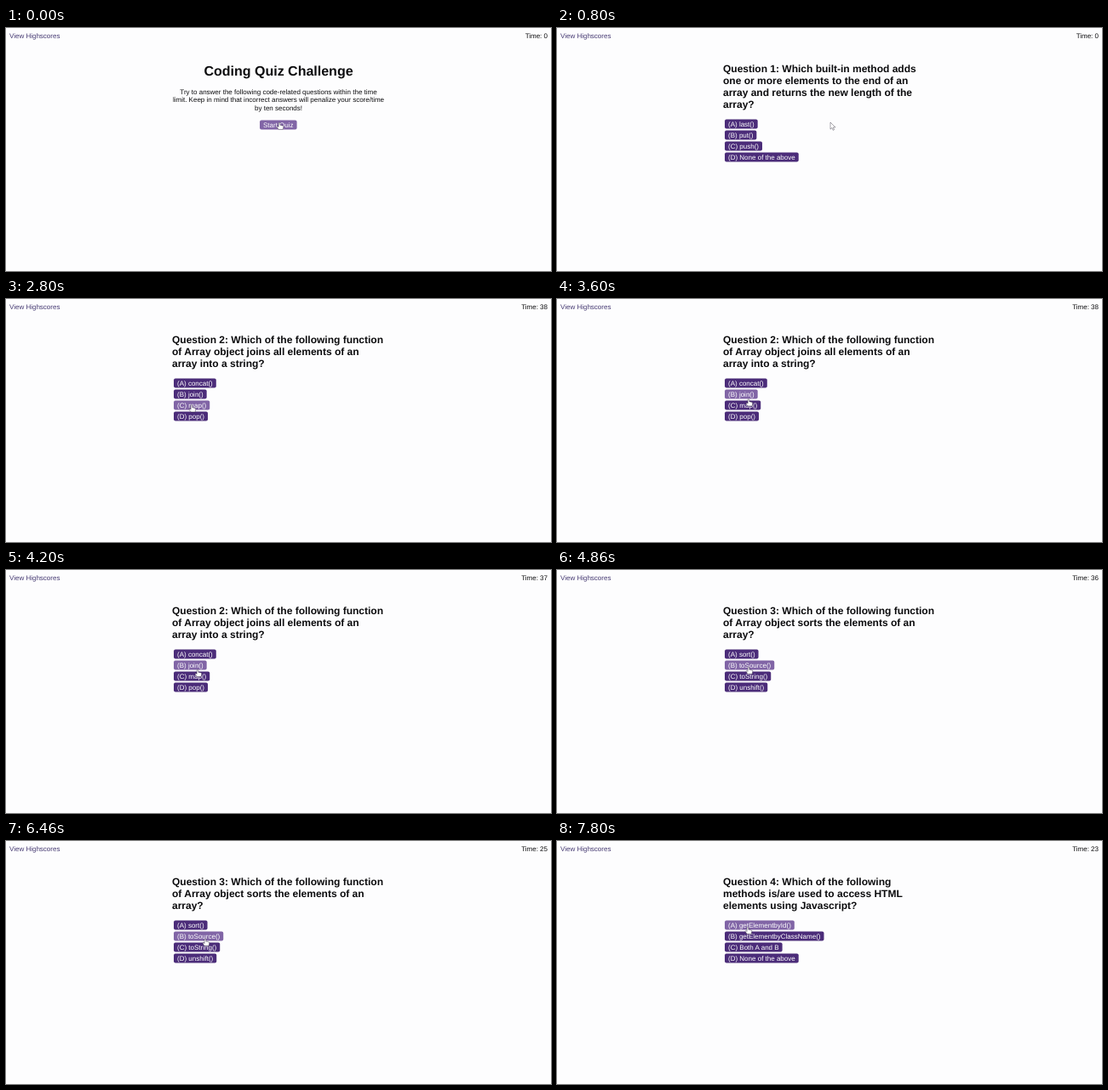
Write an HTML page with a canvas that moves like this. It is 640x286 px and loops after 8 s.

```html
<!DOCTYPE html>
<html lang="en">
<head>
<meta charset="utf-8">
<title>Coding Quiz Challenge</title>
<style>
html, body { margin: 0; width: 100%; height: 100%; overflow: hidden; background: #fdfdfe; }
canvas { display: block; width: 640px; height: 286px; }
</style>
</head>
<body>
<canvas id="stage"></canvas>
<script>
const W = 640, H = 286, LOOP = 8000, STEP = 200 / 3;
const FONT = '"Liberation Sans", Arial, sans-serif';
const INK = '#0c0c0e', LINK = '#463a72', DARK = '#4b2c79', LIGHT = '#8165a6';

const canvas = document.getElementById('stage');
const ratio = window.devicePixelRatio || 1;
canvas.width = W * ratio;
canvas.height = H * ratio;
const ctx = canvas.getContext('2d');
ctx.scale(ratio, ratio);
ctx.textRendering = 'geometricPrecision';

const screens = [
  { at: 0 },
  { at: 800,
    lines: ['Question 1: Which built-in method adds', 'one or more elements to the end of an',
      'array and returns the new length of the', 'array?'],
    answers: ['last()', 'put()', 'push()', 'None of the above'] },
  { at: 2460,
    lines: ['Question 2: Which of the following function', 'of Array object joins all elements of an',
      'array into a string?'],
    answers: ['concat()', 'join()', 'map()', 'pop()'] },
  { at: 4800,
    lines: ['Question 3: Which of the following function', 'of Array object sorts the elements of an',
      'array?'],
    answers: ['sort()', 'toSource()', 'toString()', 'unshift()'] },
  { at: 7330,
    lines: ['Question 4: Which of the following', 'methods is/are used to access HTML',
      'elements using Javascript?'],
    answers: ['getElementbyId()', 'getElementbyClassName()', 'Both A and B', 'None of the above'] }
];

const intro = ['Try to answer the following code-related questions within the time',
  'limit. Keep in mind that incorrect answers will penalize your score/time',
  'by ten seconds!'];

const clock = [
  { at: 0, left: 0 }, { at: 1860, left: 39 }, { at: 2800, left: 38 }, { at: 3860, left: 37 },
  { at: 4800, left: 36 }, { at: 5930, left: 25 }, { at: 6800, left: 24 }, { at: 7800, left: 23 }
];

// Pointer hot spot: time, x, y
const path = [
  [0, 321, 111], [1000, 321, 111], [1800, 229, 118.7], [2260, 222, 138], [2460, 222, 138],
  [2660, 218, 124.5], [3000, 218, 124.5], [3400, 224, 121], [3800, 226, 114],
  [4200, 225, 117], [4530, 225, 114], [5060, 225, 114], [5600, 239, 113],
  [5930, 238, 114], [6460, 234, 115], [6800, 232, 112], [7330, 224, 101], [8000, 224, 101]
];

const current = (list, t) => list.filter(item => item.at <= t).pop();

function pointerAt(t) {
  const time = Math.floor((t + 7) / STEP) * STEP;
  const i = Math.max(1, path.findIndex(p => p[0] >= time));
  const [t0, x0, y0] = path[i - 1], [t1, x1, y1] = path[i];
  const u = (time - t0) / (t1 - t0), k = u * u * (3 - 2 * u);
  return { x: x0 + (x1 - x0) * k, y: y0 + (y1 - y0) * k };
}

function text(str, x, y, size = 8, { color = INK, bold = false, align = 'left' } = {}) {
  ctx.font = `${bold ? 'bold ' : ''}${size}px ${FONT}`;
  ctx.fillStyle = color;
  ctx.textAlign = align;
  ctx.fillText(str, x, y);
}

// Returns whether the pointer is over the button
function button(label, x, middle, pointer) {
  ctx.font = `8px ${FONT}`;
  const w = ctx.measureText(label).width + 8, top = middle - 5.5;
  const over = pointer.x >= x && pointer.x <= x + w && pointer.y >= top && pointer.y <= top + 11;
  ctx.fillStyle = over ? LIGHT : DARK;
  ctx.beginPath();
  ctx.roundRect(x, top, w, 11, 2);
  ctx.fill();
  text(label, x + 4, middle + 2.8, 8, { color: '#fff' });
  return over;
}

const arrow = new Path2D('M0 0V8.2L1.9 6.4L3.2 9.3L4.5 8.7L3.3 5.9H5.9Z');
const hand = new Path2D('M-.9 .7Q0 -.6 .8 .7V3.2L4 3.9Q4.9 4.2 4.8 5.2L4.2 8.4H-.9L-2.9 5.6Q-3 4.5 -1.9 4.7L-.9 5.5Z');

function drawPointer({ x, y }, shape) {
  ctx.save();
  ctx.translate(x, y);
  ctx.fillStyle = '#fff';
  ctx.strokeStyle = 'rgba(20, 15, 30, .75)';
  ctx.lineWidth = 0.5;
  ctx.fill(shape);
  ctx.stroke(shape);
  ctx.restore();
}

function drawIntro(pointer) {
  text('Coding Quiz Challenge', 320, 56, 16, { bold: true, align: 'center' });
  intro.forEach((line, i) => text(line, 320, 78 + i * 9.25, 8, { align: 'center' }));
  return button('Start Quiz', 298, 114, pointer);
}

function drawQuestion({ lines, answers }, pointer) {
  lines.forEach((line, i) => text(line, 195, 52.4 + i * 14, 12, { bold: true }));
  const first = 57 + lines.length * 14;
  return answers
    .map((answer, i) => button(`(${'ABCD'[i]}) ${answer}`, 197, first + i * 13, pointer))
    .includes(true);
}

function draw(t) {
  const pointer = pointerAt(t), screen = current(screens, t);
  ctx.fillStyle = '#fdfdfe';
  ctx.fillRect(0, 0, W, H);
  text('View Highscores', 4, 11.8, 8, { color: LINK });
  text(`Time: ${current(clock, t).left}`, 636, 11.8, 8, { align: 'right' });
  const over = screen.lines ? drawQuestion(screen, pointer) : drawIntro(pointer);
  drawPointer(pointer, over ? hand : arrow);
}

const start = performance.now();
function frame() {
  draw((performance.now() - start) % LOOP);
  requestAnimationFrame(frame);
}
frame();
</script>
</body>
</html>
```
